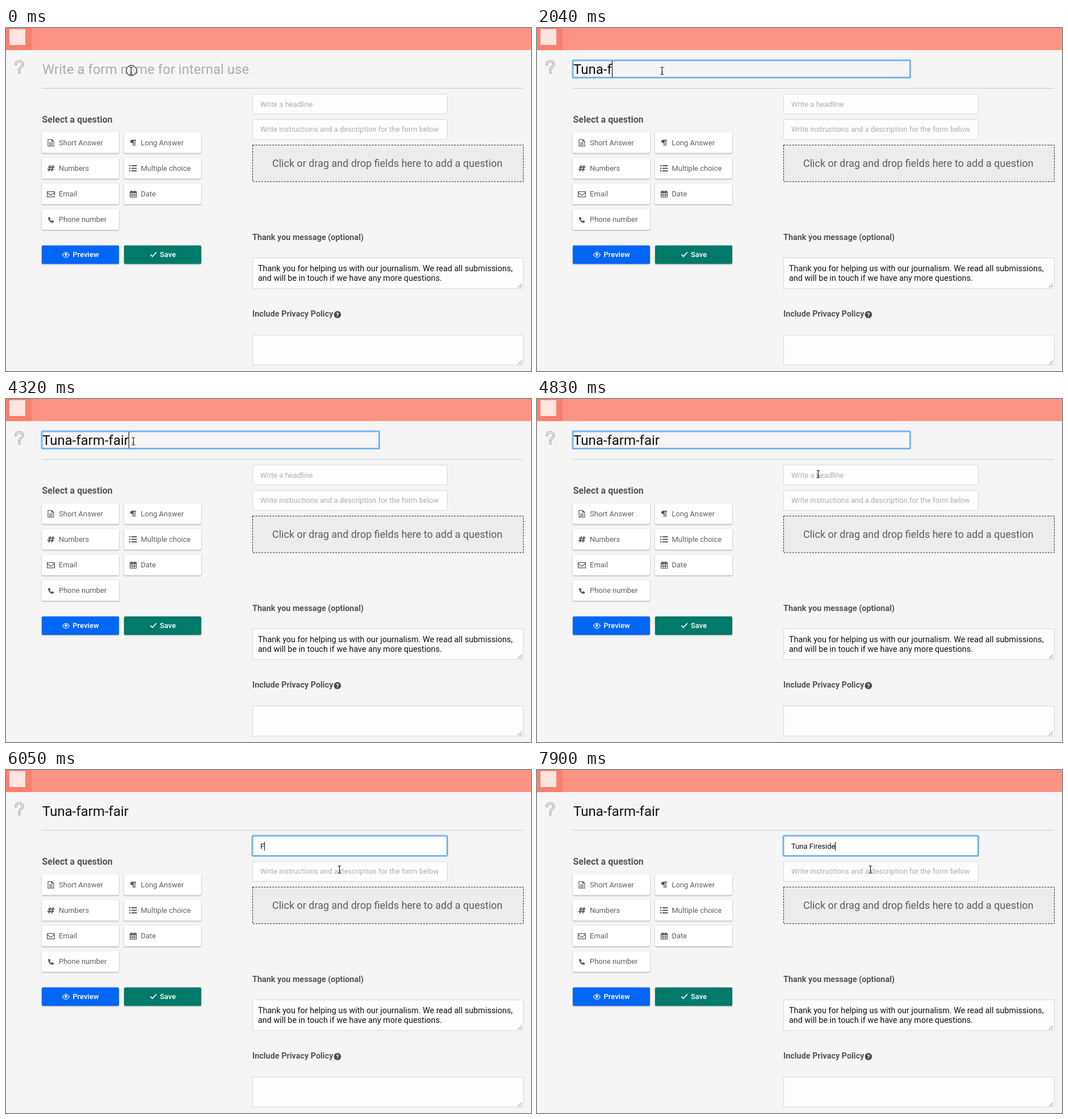
An HTML page that plays this animation: 925 px wide and 605 px high, repeating every 8 s.

```html
<!DOCTYPE html>
<html lang="en">
<head>
<meta charset="utf-8">
<title>Form builder</title>
<style>
html, body { margin: 0; width: 100%; height: 100%; overflow: hidden; background: #f5f5f5; }
svg { display: block; font: 13px Roboto, sans-serif; }
text { white-space: pre; fill: #5f5f5f; }
.bold { font-weight: 700; font-size: 14.4px; fill: #555; }
.hint { fill: #adadad; }
.typed { fill: #111; }
.title { font-size: 24px; }
.body { font-size: 14.4px; fill: #111; }
.box { fill: #fdfdfd; stroke: #d9d9d9; }
.button { filter: drop-shadow(0 1px 1px #0005); }
.button text { font-weight: 500; fill: #fff; }
.ring { fill: none; stroke: #78b3f3; stroke-width: 3; }
.icon { fill: none; stroke: #555; stroke-width: 1.2; }
.solid { fill: #555; stroke: none; }
.white { stroke: #fff; }
</style>
</head>
<body>
<svg width="925" height="605" viewBox="0 0 925 605">
  <rect width="925" height="605" fill="#f5f5f5"/>
  <rect width="925" height="39" fill="#fd9483"/>
  <rect width="45" height="39" fill="#fb7f6e"/>
  <rect x="6" y="2" width="28" height="28" fill="#fee5df"/>

  <g fill="none" stroke-linecap="round">
    <path id="help" d="M17.5 64c0-7 12-7 12 0c0 5-6 4.500-6 10M23.500 78.500v.1" stroke="#aaa" stroke-width="4"/>
    <use href="#help" style="stroke:#f5f5f5"/>
    <path d="M17.500 64c0-7 12-7 12 0c0 5-6 4.500-6 10M23.500 78.500v.1" stroke="#f5f5f5" stroke-width="1.800"/>
  </g>

  <path d="M63 106.500H911" stroke="#ccc"/>
  <text x="63.500" y="166.500" class="bold" style="font-size:16px">Select a question</text>
  <g id="buttons"></g>

  <g class="icon">
    <path d="M74 196.500h6.500l3.500 3.500v8.500h-10zM80.500 196.500v3.500h3.500M76 202.500h6M76 204.500h6M76 206.500h6"/>
    <path class="solid" d="M229 197v1.500h-1.200v9.500h-1.500v-9.500h-1.500v9.500h-1.500v-5c-6 0-6-6 0-6z"/>
    <path stroke-width="1.800" d="M78 242l-2.500 11M83 242l-2.500 11M74 245.500h11.500M73 249.500h11.500"/>
    <path stroke-width="2" d="M217 243h2.500M217 247.500h2.500M217 252h2.500M221 243h9.500M221 247.500h9.500M221 252h9.500"/>
    <path d="M72.600 288.600h12.800v9.300h-12.800zM72.600 290.500l6.400 4.500l6.400-4.500"/>
    <path d="M218.600 288.500h11v10h-11zM218.600 291h11M222.200 291v7.500M226 291v7.500M218.600 294.700h11"/>
    <path stroke-width="2" d="M218.600 289.500h11M221.500 286.500v3M226.800 286.500v3"/>
    <path class="solid" d="M74 334.500l2.500-1.500l2 3l-1.500 1.500q1 2 3 3l1.500-1.500l3 2q-.5 2.500-2.500 2.500c-4 0-8-5-8-9z"/>
  </g>

  <rect class="box" x="434.500" y="116.500" width="343" height="35" rx="2"/>
  <rect class="box" x="434.500" y="161.500" width="343" height="35" rx="2"/>
  <text class="hint" x="448" y="183">Write instructions and a description for the form below</text>
  <rect x="434.500" y="206.500" width="477" height="64.500" fill="#ececec" stroke="#222" stroke-dasharray="3 2"/>
  <text x="469" y="245" style="font-size:18px">Click or drag and drop fields here to add a question</text>

  <text x="434" y="374" class="bold">Thank you message (optional)</text>
  <rect class="box" x="434.500" y="405.500" width="477" height="54"/>
  <text x="444" y="429" class="body">Thank you for helping us with our journalism. We read all submissions,</text>
  <text x="444" y="446" class="body">and will be in touch if we have any more questions.</text>
  <text x="434" y="509" class="bold">Include Privacy Policy</text>
  <circle cx="584" cy="505.500" r="6.300" fill="#4c4c4c"/>
  <text x="584" y="509.500" text-anchor="middle" style="font-size:11px;font-weight:700;fill:#f5f5f5">?</text>
  <rect class="box" x="434.500" y="541.500" width="477" height="53"/>
  <path d="M902 458l7-7M906 458l3-3M902 593.500l7-7M906 593.500l3-3" stroke="#777"/>

  <rect id="titleRing" class="ring" x="63" y="57" width="594.500" height="30.500" rx="1"/>
  <rect id="headRing" class="ring" x="434" y="116" width="343.500" height="35.500" rx="2"/>
  <text id="title" class="title" x="64" y="81"></text>
  <text id="head" x="448" y="139"></text>
  <rect id="caret" width="1" fill="#000"/>

  <g id="pointer">
    <circle id="press" r="9" cx=".5" cy="-.5" fill="#fff9" stroke="#333" stroke-width="1.300"/>
    <g id="beam" fill="none">
      <path d="M-3-6.500q3 0 3 1.500q0-1.500 3-1.500M-3 6.500q3 0 3-1.500q0 1.500 3 1.500M0-5v10" stroke="#fffa" stroke-width="2.600"/>
      <path d="M-3-6.500q3 0 3 1.500q0-1.500 3-1.500M-3 6.500q3 0 3-1.500q0 1.500 3 1.500M0-5v10M-1.500 2.500h3" stroke="#222" stroke-width="1.200"/>
    </g>
    <path id="arrow" d="M0-6v14l3.200-3l2.200 5l2.200-1l-2.200-5h4.600z" stroke="#fff"/>
  </g>
</svg>
<script>
const $ = id => document.getElementById(id);
const LOOP = 8000, TITLE_FOCUS = 470, HEAD_FOCUS = 5100;
const title = {
  hint: "Write a form name for internal use", text: "Tuna-farm-fair", node: $("title"),
  keys: [1180, 1390, 1490, 1600, 1860, 2040, 2190, 2270, 2360, 3070, 3520, 3780, 3990, 4110]
};
const head = {
  hint: "Write a headline", text: "Tuna Fireside", node: $("head"),
  keys: [6500, 6610, 6720, 6830, 6980, 7250, 7400, 7480, 7560, 7650, 7730, 7820, 7900]
};
const TYPO = { letter: "F", from: 6050, to: 6350 };

const button = (x, y, h, fill, textX, textY, label, style = "") =>
  `<g class="button"><rect x="${x}" y="${y}" width="136" height="${h}" rx="2" fill="${fill}"/></g>
   <g class="${style}"><text x="${textX}" y="${textY}">${label}</text></g>`;
const labels = ["Short Answer", "Long Answer", "Numbers", "Multiple choice", "Email", "Date", "Phone number"];
$("buttons").innerHTML = labels.map((label, i) => {
  const x = i % 2 ? 208 : 63, y = 184 + Math.floor(i / 2) * 45.2;
  return button(x, y, 36.5, "#fff", x + (i % 2 ? 29.5 : 30), Math.round(y + 22.5), label);
}).join("") +
  button(63, 383.5, 32.5, "#0066f5", 117.5, 403.5, "") +
  button(208, 383.5, 32.5, "#007a69", 271, 403.5, "") +
  `<g style="font-weight:500"><text x="117.5" y="403.5" style="fill:#fff">Preview</text>
   <text x="271" y="403.5" style="fill:#fff">Save</text></g>
   <path class="icon white" stroke-width="1.5" d="M99.500 400q6-9 12 0q-6 9-12 0z"/>
   <circle cx="105.500" cy="399.500" r="2.300" fill="#fff"/>
   <path class="icon white" style="stroke-width:1.700" d="M254.500 399.500l3.500 3.500l7-7.500"/>`;

const clamp = v => Math.max(0, Math.min(1, v));
const ease = v => (v = clamp(v), v * v * (3 - 2 * v));
const fade = (t, from) => t < from ? 0 : clamp((t - from + 30) / 120);
const curve = (a, b, c, p) => a * (1 - p) ** 2 + 2 * b * p * (1 - p) + c * p * p;
const show = (id, on) => $(id).style.display = on ? "" : "none";

function write(field, t) {
  let value = field.text.slice(0, field.keys.filter(k => k <= t).length);
  if (field === head && t >= TYPO.from && t < TYPO.to) value = TYPO.letter;
  field.node.textContent = value || field.hint;
  field.node.classList.toggle("typed", !!value);
  field.node.classList.toggle("hint", !value);
  return value ? field.node.getComputedTextLength() : 0;
}

function drawCaret(t, titleWidth, headWidth) {
  const inHead = t >= HEAD_FOCUS;
  const marks = [TITLE_FOCUS, HEAD_FOCUS + 10, TYPO.from, TYPO.to, ...title.keys, ...head.keys];
  const last = Math.max(...marks.filter(m => m <= t));
  show("caret", t >= TITLE_FOCUS && (t - last) % 1000 < 500);
  const caret = $("caret");
  caret.setAttribute("x", Math.round(inHead ? 448 + headWidth : 64 + titleWidth));
  caret.setAttribute("y", inHead ? 127 : 58);
  caret.setAttribute("height", inHead ? 15 : 29);
}

function drawPointer(t) {
  const first = ease((t - 4290) / 540), second = ease((t - 5170) / 170);
  const x = curve(220, 440, 495, first) + 92 * second;
  const y = curve(75, 25, 132, first) + 43 * second;
  const inField = y < 89 || (y > 115 && y < 152) || y > 161;
  $("pointer").setAttribute("transform", `translate(${Math.round(x) + .5} ${Math.round(y) + .5})`);
  show("press", t < 20);
  show("beam", inField);
  show("arrow", !inField);
}

function draw(now) {
  const t = now % LOOP;
  const headFade = fade(t, HEAD_FOCUS);
  $("titleRing").style.opacity = fade(t, TITLE_FOCUS) * (1 - headFade);
  $("headRing").style.opacity = headFade;
  drawCaret(t, write(title, t), write(head, t));
  drawPointer(t);
}

const start = performance.now();
function tick() {
  draw(performance.now() - start);
  requestAnimationFrame(tick);
}
tick();
</script>
</body>
</html>
```
